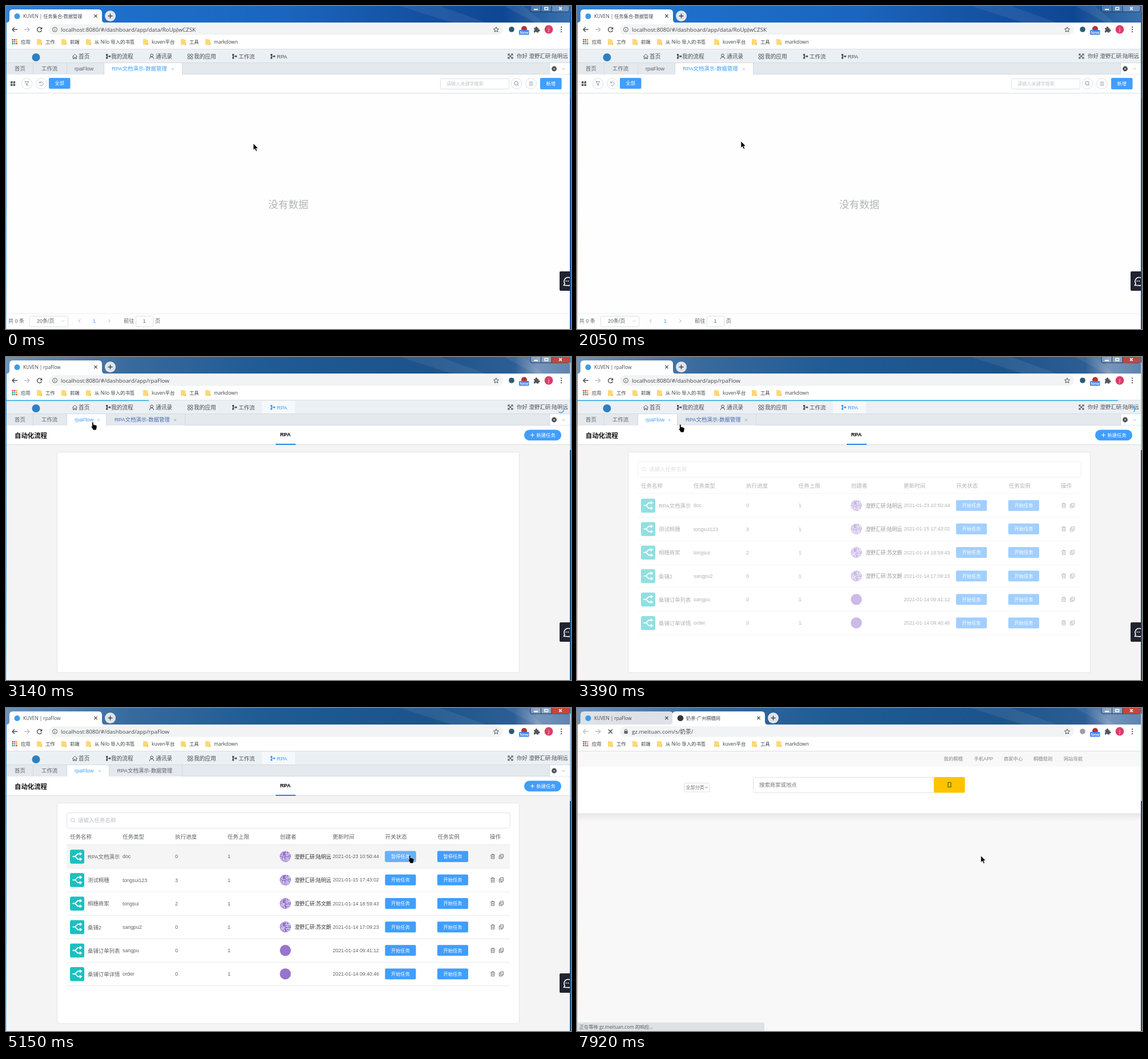
Write an HTML page that moves like this. It is 989 px wide and 566 px high and loops after 7990 ms.

```html
<!DOCTYPE html>
<html lang="zh-CN">
<head>
<meta charset="utf-8">
<title>RPA</title>
<style>
html, body { margin: 0; width: 100%; height: 100%; overflow: hidden; background: #fff; }
svg { display: block; }
text { font-family: "Liberation Sans", "Noto Sans CJK SC", "Noto Sans CJK", sans-serif; white-space: pre; }
.ui text { font-family: "Open Sans", "Noto Sans CJK SC", "Noto Sans CJK", sans-serif; }
</style>
</head>
<body>
<svg id="stage" width="989" height="566" viewBox="0 0 989 566"></svg>
<script>
const LOOP = 7990, TICK = 77;
const OPEN = 2970, NEWTAB = 6510, COMMIT = 7300, TITLE = 7550;
const BLUE = '#409eff', INK = '#606266', HINT = '#c0c4cc';

// Drawing helpers; text is centred vertically on y
const text = (x, y, s, size = 9.4, fill = INK, more = '') =>
  `<text x="${x}" y="${(y + size * .36).toFixed(2)}" font-size="${size}" fill="${fill}" ${more}>${s}</text>`;
const mid = 'text-anchor="middle"';
const rect = (x, y, w, h, fill, r = 0, more = '') =>
  `<rect x="${x}" y="${y}" width="${w}" height="${h}" rx="${r}" fill="${fill}" ${more}/>`;
const box = (x, y, w, h, line, r = 2, fill = '#fff') => rect(x + .5, y + .5, w, h, fill, r, `stroke="${line}"`);
const dot = (x, y, r, fill, more = '') => `<circle cx="${x}" cy="${y}" r="${r}" fill="${fill}" ${more}/>`;
const line = (d, stroke = INK, w = 1, more = '') =>
  `<path d="${d}" fill="none" stroke="${stroke}" stroke-width="${w}" ${more}/>`;
const move = (x, y, s) => `<g transform="translate(${x} ${y})">${s}</g>`;
const during = (from, to, s) => `<g data-on="${from} ${to}">${s}</g>`;
const cross = (x, y, r, c = INK, w = 1) =>
  line(`M${x - r} ${y - r}l${2 * r} ${2 * r}m0 ${-2 * r}l${-2 * r} ${2 * r}`, c, w);
const lens = (x, y, c) => dot(x, y, 3.2, 'none', `stroke="${c}"`) + line(`M${x + 2.3} ${y + 2.3}l2 2`, c);
const chevron = (x, y, c) => line(`M${x - 2.5} ${y - 1.2}l2.5 2.5 2.5-2.5`, c, .9);
const button = (x, y, w, h, s, fill = BLUE) =>
  rect(x, y, w, h, fill, 2) + text(x + w / 2, y + h / 2, s, 8.3, '#fff', mid);

// Desktop and browser window
const stops = list => list.map(([o, c]) => `<stop offset="${o}" stop-color="${c}"/>`).join('');
const defs = `<defs>
  <linearGradient id="sky1">${stops([[0, '#3580d0'], [.2, '#1d6fc9'], [.5, '#1a65bd'], [.7, '#1553a4'], [.88, '#0f4693'], [.94, '#28609f'], [1, '#3a70ae']])}</linearGradient>
  <linearGradient id="sky2">${stops([[0, '#6f92bb'], [.22, '#386a9d'], [.45, '#1f5b95'], [.75, '#1c538b'], [.9, '#2c5e95'], [.94, '#7895ba'], [1, '#5d84af']])}</linearGradient>
  <linearGradient id="rim" x2="0" y2="1">${stops([[0, '#2f78c8'], [.6, '#4b9be2'], [1, '#a8dcf5']])}</linearGradient>
  <linearGradient id="shade" x2="0" y2="1">${stops([[0, '#e6e6e6'], [1, '#f8f8f8']])}</linearGradient>
  <clipPath id="round"><circle r="9.7"/></clipPath>
  <clipPath id="win"><rect width="987" height="566"/></clipPath>
</defs>`;

const desktop = (sky, top, low, close) =>
  rect(0, 0, 989, 30, `url(#${sky})`) +
  '<path d="M690 0h70l80 29h-60zM872 0h34l34 29h-14z" fill="#fff" opacity=".07"/>' +
  rect(987, 10, 2, 153, top) + rect(987, 163, 2, 403, low) +
  rect(918, -3, 68, 13, '#ffffff30', 3, 'stroke="#17365c"') + rect(955, -3, 31, 13, close, 3) +
  line('M936.5 0V10M955 0V10', '#17365c') + rect(924, 5, 7, 2.2, '#fff') +
  rect(943, 2.5, 5.5, 4, 'none', 0, 'stroke="#fff" stroke-width="1.5"') + cross(970.5, 4.5, 2.3, '#fff', 1.7);

const tabShape = (x, fill) =>
  `<path d="M${x - 5} 29q5 0 5-5V12q0-6 6-6h150q6 0 6 6v12q0 5 5 5z" fill="${fill}"/>`;
const firstTab = fill => tabShape(6, fill) + dot(19.5, 18, 5, '#3d9be9');
const plus = x => dot(x, 17.5, 9.5, '#dfe5ec') + line(`M${x - 4} 17.5h8m-4-4v8`, '#3c4043', 1.4);
const back = c => line('M20 41.2h-9m4-4l-4 4 4 4', c, 1.4);
const info = dot(85.5, 41.2, 4, 'none', 'stroke="#5f6368"') + line('M85.5 40.7v2.6m0-4.6v1', '#5f6368');
const lock = rect(82.5, 40, 6.2, 5, '#5f6368', .8) + line('M83.8 40.5v-1.5a1.8 1.8 0 0 1 3.6 0v1.5', '#5f6368');
const title = (x, s) => text(x, 18, s, 8.2, '#45494d');
const url = (s, size = 9.8) => text(96, 41, s, size, '#45494d');

const bookmarks = [[54, '工作'], [97, '前端'], [140, '从 Nilo 导入的书签'], [240, 'kuven平台'], [306, '工具'], [349, 'markdown']]
  .map(([x, s]) => `<path d="M${x} 58h5l1 1h2.5v9h-8.5z" fill="#fcd975"/>` +
    line(`M${x + 6} 67.5h2.5v-3`, '#e9b949', 1) + text(x + 15, 63, s, 8.4, '#3c4043')).join('');
const appDots = ['#d93025', '#d93025', '#f29900', '#1e8e3e', '#4285f4', '#f29900', '#1e8e3e', '#4285f4', '#d93025']
  .map((c, i) => rect(10.5 + i % 3 * 3.4, 58 + (i / 3 | 0) * 3.4, 2.3, 2.3, c)).join('');

const browser = `<g class="ui">` +
  during(0, 2500, desktop('sky1', '#1c63b4', '#164d93', '#ffffff18')) +
  during(2500, LOOP, desktop('sky2', '#a5bfdc', '#174a82', '#c4473a')) +
  rect(0, 29, 987, 537, '#fff') +
  during(0, NEWTAB, firstTab('#fff') + plus(182.5)) +
  during(NEWTAB, LOOP, firstTab('#dee1e6') + tabShape(167, '#fff') + plus(343.5) + cross(318, 17.5, 2.6, '#3c4043', 1.2)) +
  cross(157, 17.5, 2.6, '#3c4043', 1.2) +
  rect(75, 32, 795, 18.5, '#f1f3f4', 9.2) +
  during(0, OPEN, title(30, 'KUVEN | 任务集合-数据管理') + url('localhost:8080/#/dashboard/app/data/RoUpJwCZSK')) +
  during(OPEN, LOOP, title(30, 'KUVEN | rpaFlow')) +
  during(OPEN, NEWTAB, url('localhost:8080/#/dashboard/app/rpaFlow')) +
  during(NEWTAB, LOOP, url('gz.meituan.com/s/奶茶/', 9.75) + cross(58.5, 41.2, 3.6, '#4a4e52', 1.4)) +
  during(0, NEWTAB, back('#4a4e52') + line('M62.2 39.5a4 4 0 1 0 .3 3', '#4a4e52', 1.4) +
    '<path d="M63.3 36.7v4.2h-4.2z" fill="#4a4e52"/>' + dot(885, 41, 4.8, '#2f5a70')) +
  during(NEWTAB, LOOP, back('#bcbfc3') + dot(885, 41, 4.8, '#9a9fa3')) +
  line('M32 41.2h9m-4-4l4 4-4 4', '#bcbfc3', 1.4) +
  during(0, COMMIT, info) + during(COMMIT, LOOP, lock) +
  line('M858 36.8l1.3 3 3.2.3-2.4 2.1.7 3.2-2.8-1.7-2.8 1.7.7-3.2-2.4-2.1 3.2-.3z', '#4a4e52') +
  dot(907, 40, 5, '#b8322f') + rect(898, 42, 17.5, 8.5, '#3f83ea', 1.5) +
  text(906.8, 46.3, 'New', 7, '#fff', mid + ' font-weight="600"') +
  '<path d="M924 38.5h2.6a1.8 1.8 0 1 1 3.4 0h2.2v2.6a1.8 1.8 0 1 1 0 3.3v2h-3a1.7 1.7 0 0 0-3.2 0h-2v-3a1.7 1.7 0 0 0 0-3.2z" fill="#53575b"/>' +
  dot(950, 41, 7.4, '#dc3c68') + text(950, 40.5, 'j', 8.5, '#fff', mid) +
  [37.2, 41.2, 45.2].map(y => dot(972, y, 1.1, '#4a4e52')).join('') +
  appDots + text(26, 63, '应用', 8.4, '#3c4043') + bookmarks +
  rect(0, 75, 987, 1, '#dcdfe3') +
  during(NEWTAB, TITLE, title(191, '正在加载...') +
    move(181, 18, `<g id="loader">${line('M-5.4-2a5.8 5.8 0 0 1 4.6-3.6', '#80868b', 1.2)}</g>`)) +
  during(TITLE, LOOP, title(191, '奶茶-广州桐穗网') + dot(181, 17.8, 5.3, '#33363d')) +
  '</g>';

// Shared application frame
const flowIcon = (x, c) => rect(x - 4, 84, 3.2, 3.2, c) + rect(x + 1, 86.8, 3.2, 2.8, c) + rect(x - 4, 89.5, 3.2, 3, c) +
  line(`M${x - 2.4} 85v6M${x - 2} 88.2h4`, c);
const navDark = '#4b4f55';
const nav = rect(1, 76, 986, 24, '#ebf0f4') + dot(52.5, 90, 7, '#2c80c3') +
  line('M116.3 88.5l4.2-4 4.2 4M117.5 88v4.5h2v-2.7h2v2.7h2V88', navDark, .9) + text(127, 88.5, '首页', 9.7, navDark) +
  flowIcon(179, navDark) + text(184, 88.5, '我的流程', 9.7, navDark) +
  dot(255, 86.4, 2.4, 'none', `stroke="${navDark}"`) + line('M251.2 93q.3-4 3.8-4t3.8 4', navDark) + text(262, 88.5, '通讯录', 9.7, navDark) +
  [[320, 86], [325, 86], [320, 91], [325, 91]].map(([x, y]) => dot(x, y, 2, 'none', `stroke="${navDark}" stroke-width=".9"`)).join('') +
  text(329, 88.5, '我的应用', 9.7, navDark) + flowIcon(400, navDark) + text(407, 88.5, '工作流', 9.5, navDark) +
  during(0, OPEN, flowIcon(467, navDark) + text(474, 88.5, 'RPA', 9.2, navDark)) +
  during(OPEN, NEWTAB, rect(448, 77, 58, 22, '#f6f9fc') + flowIcon(467, BLUE) + text(474, 88.5, 'RPA', 9.2, BLUE)) +
  cross(882.8, 88, 3.6, navDark, 1.2) +
  line('M879 87v-3h3m2 0h3v3m0 2v3h-3m-2 0h-3v-3', navDark, 1.1) +
  text(894, 88, '你好 澄野汇研:陆明远', 9.4, navDark);

const grey = '#e4e9ee';
const tab = (x, w, s, tx, o = {}) => rect(x, 100, w, 20, o.on ? '#fff' : grey) + rect(x + w - 1, 100, 1, 20, '#d3d9df') +
  text(tx, 110, s, 9.4, o.on ? BLUE : o.ink || INK) + (o.x ? cross(o.x, 110.5, 1.8, o.on ? '#74b4f5' : '#8a9097', .8) : '');
const dataName = 'RPA文档演示-数据管理';
const tabs = rect(1, 100, 986, 20, grey) + rect(1, 99, 986, 1, '#d3d9df') + rect(309, 119, 642, 1, '#d3d9df') +
  tab(1, 47, '首页', 15) + tab(48, 59, '工作流', 62) +
  during(0, 2740, tab(107, 65, 'rpaFlow', 120)) +
  during(2740, OPEN, tab(107, 65, 'rpaFlow', 115.5, { x: 159 })) +
  during(0, OPEN, tab(172, 137, dataName, 185, { on: 1, x: 292 })) +
  during(OPEN, 3460, tab(176, 138, dataName, 190, { x: 296, ink: '#4a6db5' }) + tab(107, 69, 'rpaFlow', 120, { on: 1, x: 162 })) +
  during(3460, NEWTAB, tab(181, 128, dataName, 194.5) + tab(107, 74, 'rpaFlow', 120, { on: 1, x: 164 })) +
  rect(951, 100, 36, 19, '#fff') + rect(951, 100, 1, 20, '#d3d9df') +
  dot(959.5, 110, 4.4, '#44474c') + cross(959.5, 110, 1.5, '#fff') + chevron(976, 110, '#b4a77f');

// Empty data page
const ring = x => dot(x, 136, 9.3, '#fff', 'stroke="#dcdfe6"');
const dataPage = rect(1, 120, 986, 446, '#fefefe') + rect(1, 120, 986, 32, '#fff') + rect(1, 152, 986, 1.5, '#e6e8ea') +
  [[8, 132], [12.6, 132], [8, 136.6], [12.6, 136.6]].map(([x, y]) => rect(x, y, 3.5, 3.5, '#55585c')).join('') +
  ring(36.5) + line('M33 132.5h7l-2.7 3.5v3.5l-1.6-1V136z', '#85898f', .9) +
  ring(62) + line('M59 134.5a3.3 3.3 0 1 1 0 3.4M58.7 132.3v2.5h2.5', '#85898f', .9) +
  button(75, 126, 37.5, 19, '全部') +
  box(760, 127, 120, 18, '#dcdfe6') + text(771, 136, '请输入关键字搜索', 8.1, HINT) +
  ring(893.5) + lens(893, 135.4, '#85898f') + ring(919) + line('M915.5 133.3h7m-7 2.7h7m-7 2.7h7', '#85898f', .9) +
  button(935, 126, 37.5, 20, '新增') + text(459, 348, '没有数据', 17.6, '#b4b5b6') +
  rect(1, 538.5, 986, 1, '#eceef0') + text(4, 552, '共 0 条', 9) +
  box(41, 543, 67, 18.5, '#dcdfe6') + text(54, 552, '20条/页', 9) + chevron(100, 552, HINT) +
  line('M130 549.3l-2.7 2.7 2.7 2.7', '#a5a8ae') + text(154.5, 552, '1', 9, BLUE, mid) + line('M179.5 549.3l2.7 2.7-2.7 2.7', '#a5a8ae') +
  text(206, 552, '前往', 9.3) + box(227, 543, 30, 18.5, '#dcdfe6') + text(242, 552, '1', 9, INK, mid) + text(261, 552, '页', 9);

// Task list page
const people = { a: '陆明远', b: '苏文朗' };
const tasks = [
  ['RPA文档演示', 'doc', 0, 'a', '23 10:50:44'], ['测试桐穗', 'tongsui123', 3, 'a', '15 17:43:02'],
  ['桐穗商家', 'tongsui', 2, 'b', '14 18:59:43'], ['桑铺2', 'sangpu2', 0, 'b', '14 17:09:23'],
  ['桑铺订单列表', 'sangpu', 0, '', '14 09:41:12'], ['桑铺订单详情', 'order', 0, '', '14 09:40:46']];
const heads = ['任务名称', '任务类型', '执行进度', '任务上限', '创建者', '更新时间', '开关状态', '任务实例', '操作'];

const branch = rect(-12.5, -12, 25, 24.5, '#1bc0c2', 3) +
  line('M-8 0h4.5l4.5-4.7h5M-3.5 0l4.5 4.7h5', '#fff', 1.9) +
  '<path d="M4.5-8l4.5 3.3L4.5-1.4zM4.5 1.4l4.5 3.3L4.5 8z" fill="#fff"/>';
const bin = line('M-3.7-2.8h7.4M-1.3-3v-1h2.6v1M-2.7-2.6v6.4h5.4v-6.4M-.9-1v3M.9-1v3', '#66696e', .9);
const copy = line('M-1.7-3.8h5.4v5.5h-5.4zM-2-1.6h-1.7v5.4h5.4V2M-.5-1h3', '#66696e', .9);

const row = ([name, type, done, who, date], i) => {
  const y = 260.2 + i * 41.15, full = people[who];
  const face = dot(0, 0, 9.7, '#9575cd') + (full ? `<g clip-path="url(#round)">${text(0, -4.3, '汇研', 9.4, '#fff', mid)}${text(0, 5.2, full.slice(0, 2), 9.4, '#fff', mid)}</g>` : '');
  return move(124.5, y, branch) + text(143, y + .5, name, 9.4) + text(204, y, type, 8.8) +
    text(296, y, done, 8.8) + text(388, y, 1, 8.8) + move(489, y, face) +
    (full ? text(505, y + .3, '澄野汇研:' + full, 8.8, '#303133') : '') + text(572, y, '2021-01-' + date, 8.73) +
    button(663.5, y - 9.5, 54, 19, '开始任务') + button(755, y - 9.5, 54, 19, '开始任务') +
    move(852, y, bin) + move(867, y, copy) + rect(106, y + 20.3, 776, 1, '#e8eaee');
};
const live = (from, to, s, fill) => during(from, to, button(663.5, 250.7, 54, 19, s, fill));
const listPage = rect(1, 120, 986, 446, '#f4f4f4') + rect(1, 120, 986, 33, '#fff') + rect(1, 153, 986, 1.2, '#dfe1e3') +
  text(15, 138, '自动化流程', 11.4, '#111', 'font-weight="700"') +
  text(489, 135.5, 'RPA', 9, '#222', mid + ' font-weight="600" stroke="#222" stroke-width=".2"') + rect(472, 152, 35, 2, '#2a86e2') +
  rect(907, 127.5, 65, 18.7, BLUE, 9.3) + line('M918 136.8h7m-3.5-3.5v7', '#fff') + text(928.5, 136.8, '新建任务', 8.3, '#fff') +
  box(89, 166, 809, 386.5, '#e2e4e7', 3) +
  '<g id="table">' + during(3690, NEWTAB, rect(106, 240, 776, 40.5, '#f5f5f5')) +
  box(106, 183, 775.5, 27, '#dfe2e8', 3) + lens(116.7, 196.2, HINT) + text(126, 197, '请输入任务名称', 9.5, '#b9bdc5') +
  heads.map((s, i) => text(i < 8 ? 112 + i * 91.95 : 847, 225.3, s, 9.5, INK)).join('') + rect(106, 239, 776, 1, '#e8eaee') +
  tasks.map(row).join('') +
  live(4300, 4910, '开始任务', '#66b1ff') + live(4910, 5070, '开始任务', '#3a8ee6') + live(5070, NEWTAB, '暂停任务', '#66b1ff') +
  during(5070, NEWTAB, button(755, 250.7, 54, 19, '暂停任务')) + '</g>';

const progress = '<rect id="bar" x="1" y="75.5" height="1.6" fill="#35b0e6"/>' +
  during(OPEN, 3540, move(971, 92, `<g id="spin">${line('M1-5.5a5.6 5.6 0 0 1 2.6 9.6', '#35a8ea', 1.4)}</g>`));
const chat = rect(969, 465, 22, 34, '#20242f', 2) +
  line('M978.5 489.5h-2l1.5-3a7.2 7.2 0 1 1 5 3.3z', '#fff', 1.6) + dot(980.5, 482, 1, '#fff') + dot(984, 482, 1, '#fff');

// Search site
const links = [[642, '我的桐穗'], [695, '手机APP'], [747, '商家中心'], [799, '桐穗规则'], [852, '网站导航']];
const site = during(COMMIT, LOOP, rect(1, 76, 986, 490, '#f8f8f8') + rect(1, 102.5, 986, 82, '#fff') + rect(1, 184.5, 986, 14, 'url(#shade)')) +
  during(TITLE, LOOP, links.map(([x, s]) => text(x, 89.5, s, 8.3, '#85878a')).join('')) +
  during(7700, LOOP, box(187, 131, 44.5, 15.5, '#e0e0e0') + text(190.5, 139, '全部分类', 8.1, '#777') + chevron(226.5, 139, '#777') +
    box(308, 121, 317, 27, '#e2e2e2') + text(319, 135, '搜索商家或地点', 9.4, '#77797c') +
    rect(624.5, 121, 54.5, 27.5, '#ffc300', 2) + rect(649.5, 130.5, 5, 8, 'none', 0, 'stroke="#4c6a10" stroke-width="1.2"')) +
  during(7380, LOOP, '<path d="M0 551h325q3 0 3 3v12H0z" fill="#dee1e6"/>' +
    `<g class="ui">${text(4, 559, '正在等待 gz.meituan.com 的响应...', 8.2, '#55595e')}</g>`);

const arrow = '<path d="M0 0v11.6l2.7-2.5 1.9 4.4 2-.8-1.9-4.3h3.7z" fill="#000" stroke="#fff" stroke-width=".6"/>';
const hand = '<path d="M2.8 0q1.2 0 1.2 1.2v3.4q2.6 0 5 1.2 1.3.6 1.1 2.2l-.6 3.2q-.2 1.3-.9 2.8h-5q-.9-2.6-3.2-5.2-.6-1 .2-1.4.5-.2 1 .4V1.2q0-1.2 1.2-1.2z" fill="#000" stroke="#fff" stroke-width=".6"/>';
const cursor = `<g id="cursor">${during(0, 2740, arrow) + during(2740, 3460, hand) + during(3460, 4300, arrow) + during(4300, 6310, hand) + during(6310, LOOP, arrow)}</g>`;

const stage = document.getElementById('stage');
stage.innerHTML = defs + browser + '<g clip-path="url(#win)">' +
  during(0, NEWTAB, nav + tabs + during(0, OPEN, dataPage) + during(OPEN, NEWTAB, listPage + progress) + chat) +
  site + '</g>' + rect(0, 29, 1, 537, 'url(#rim)') + cursor;

// Timeline
const path = [[0, 433, 241], [385, 433, 241], [616, 424, 275], [847, 500, 365], [1155, 604, 391], [1310, 616, 398],
  [1540, 540, 335], [1771, 390, 268], [2002, 287, 237], [2079, 287, 237], [2464, 215, 170], [2772, 138, 112], [2970, 138, 112],
  [3388, 178, 118], [3540, 300, 190], [3696, 426, 270], [4004, 570, 268], [4466, 707, 258], [4620, 704, 258], [6300, 704, 258], [6308, 707, 259], [LOOP, 707, 259]];
const ease = (t, a, b) => Math.min(1, Math.max(0, (t - a) / (b - a)));
const at = t => {
  const i = Math.max(1, path.findIndex(p => p[0] > t));
  const [t0, x0, y0] = path[i - 1], [t1, x1, y1] = path[i], k = ease(t, t0, t1);
  return [x0 + (x1 - x0) * k, y0 + (y1 - y0) * k];
};
const timed = [...stage.querySelectorAll('[data-on]')].map(el => [el, ...el.dataset.on.split(' ').map(Number)]);
const [table, bar, spin, loader, pointer] = ['table', 'bar', 'spin', 'loader', 'cursor'].map(id => document.getElementById(id));

function render(t) {
  for (const [el, from, to] of timed) el.style.display = t >= from && t < to ? '' : 'none';
  const q = Math.floor(t / TICK) * TICK;
  const [x, y] = at(t >= 6310 ? t : q);
  pointer.setAttribute('transform', `translate(${Math.round(x)} ${Math.round(y)})`);
  table.setAttribute('opacity', ease(q, 3240, 3540));
  bar.setAttribute('width', 946 * ease(q, OPEN, 3388) + 40 * ease(q, 3388, 3500));
  bar.setAttribute('opacity', 1 - ease(q, 3500, 3620));
  spin.setAttribute('transform', `rotate(${(q - 3388) * .9})`);
  loader.setAttribute('transform', `rotate(${-Math.max(0, q - NEWTAB) * .36})`);
}
const start = performance.now();
function frame() {
  render((performance.now() - start) % LOOP);
  requestAnimationFrame(frame);
}
frame();
</script>
</body>
</html>
```
